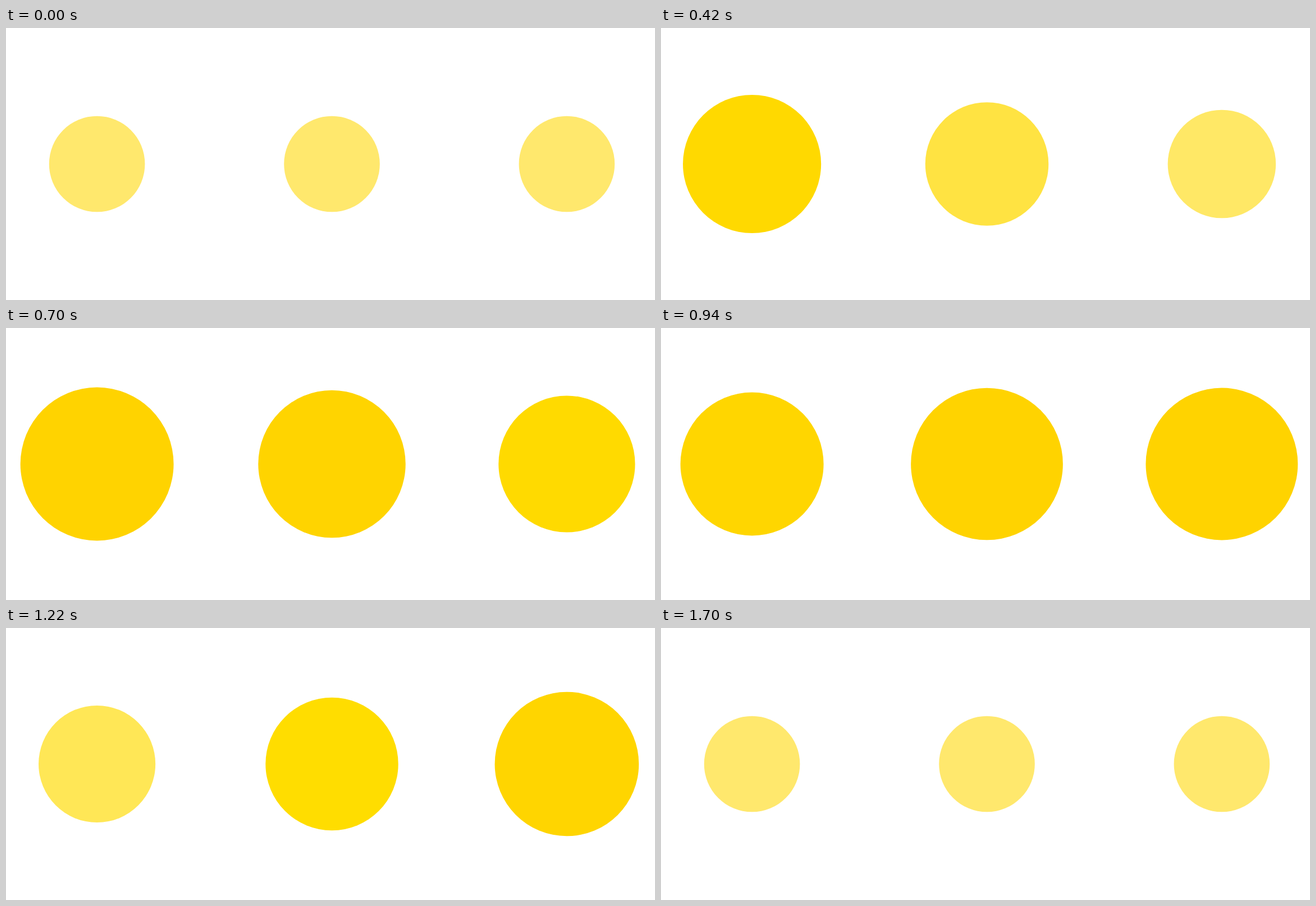
Recreate the animation shown at these times as an HTML page. Size 1156 px wide and 484 px high, loop 1720 ms.

```html
<!DOCTYPE html>
<html lang="en">
<head>
<meta charset="utf-8">
<title>Pulsing dots</title>
<style>
  html, body { margin: 0; width: 100%; height: 100%; overflow: hidden; background: #fff; }
  svg { display: block; width: 100%; height: 100%; }
</style>
</head>
<body>
<svg viewBox="0 0 1156 484">
  <circle cx="162.1" cy="242"/>
  <circle cx="580.5" cy="242"/>
  <circle cx="998.9" cy="242"/>
</svg>
<script>
const LOOP = 1720;
const LAST = 1700; // every dot is at rest from here on
const HALF = 711;  // ms to grow, and to shrink again
const R_MIN = 85.3, R_MAX = 136.5;
const delays = [0, 157, 299];
const circles = document.querySelectorAll('circle');

const clamp = x => Math.min(1, Math.max(0, x));
const mix = (a, b, k) => a + (b - a) * k;
const smooth = x => x * x * (3 - 2 * x);
const bezier = (p1, p2, s) => 3 * (1 - s) * (1 - s) * s * p1 + 3 * (1 - s) * s * s * p2 + s ** 3;

// Linear departure, soft arrival: cubic-bezier(1/6, 1/6, 2/3, 1)
function ease(x) {
  let lo = 0, hi = 1;
  for (let i = 0; i < 24; i++) {
    const mid = (lo + hi) / 2;
    if (bezier(1 / 6, 2 / 3, mid) < x) lo = mid; else hi = mid;
  }
  return bezier(1 / 6, 1, lo);
}

function pulse(t, start) {
  const peak = start + HALF;
  const end = Math.min(peak + HALF, LAST);
  return ease(clamp(t < peak ? (t - start) / HALF : (end - t) / (end - peak)));
}

// Pale yellow loses its blue early, then turns to gold
function color(p) {
  const green = mix(232, 211, smooth(clamp((p - 0.25) / 0.75)));
  const blue = 109 * Math.sqrt(clamp(1 - (p / 0.6) ** 2));
  return `rgb(255,${Math.round(green)},${Math.round(blue)})`;
}

function draw(t) {
  circles.forEach((circle, i) => {
    const p = pulse(t, delays[i]);
    circle.setAttribute('r', mix(R_MIN, R_MAX, p).toFixed(2));
    circle.setAttribute('fill', color(p));
  });
}

let origin;
function tick(now) {
  origin ??= now;
  draw((now - origin) % LOOP);
  requestAnimationFrame(tick);
}
draw(0);
requestAnimationFrame(tick);
</script>
</body>
</html>
```
